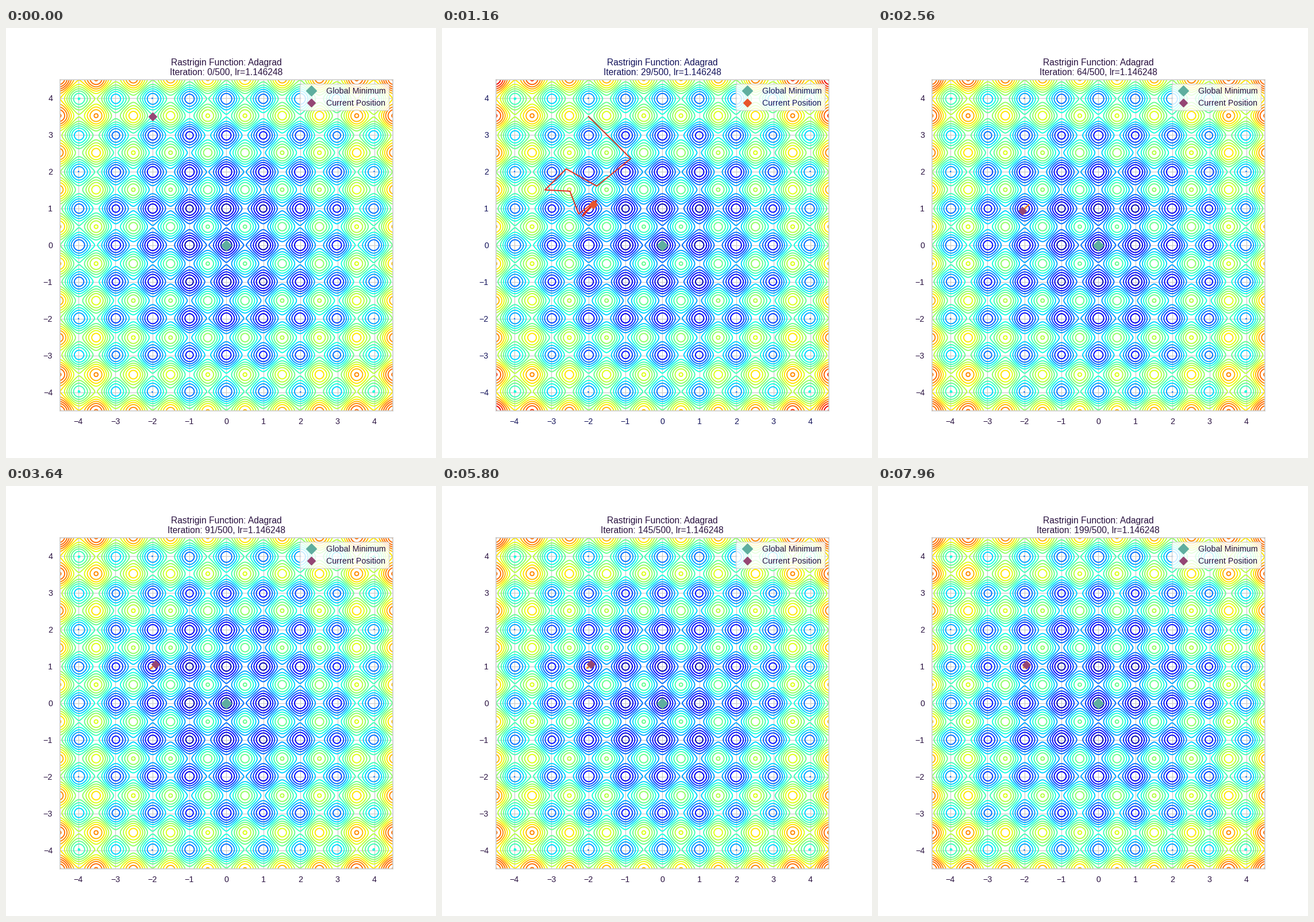
Write a matplotlib script that moves like this. It is 748 px wide and 748 px high and loops after 8000 ms.

```python
import numpy as np
import matplotlib.pyplot as plt
from matplotlib.animation import FuncAnimation

plt.rcParams.update({
    "font.family": "Liberation Sans",
    "font.size": 12,
    "axes.titlesize": 12,
    "xtick.labelsize": 11,
    "ytick.labelsize": 11,
    "legend.fontsize": 11,
    "lines.linewidth": 1.5,
    "lines.solid_capstyle": "round",
    "axes.edgecolor": "0.8",
    "axes.linewidth": 1.25,
    "axes.axisbelow": True,
})

FRAMES, INTERVAL = 200, 40
LR = 1.146248
TRAIL = 30
LIMIT = 4.5
BOX = [0.125, 0.11, 0.775, 0.77]
TEAL = "#5fae9f"

# Two palettes: calm, and a warmer one while a long trail is on show.
CALM = dict(text="#28103f", marker="#954674", trail="#f5862a", top=0.79)
WARM = dict(text="#12125a", marker="#e8552c", trail="#e02f20", top=0.93)


def rastrigin(x, y):
    return (20 + x**2 - 10 * np.cos(2 * np.pi * x)
            + y**2 - 10 * np.cos(2 * np.pi * y))


def gradient(p):
    return 2 * p + 20 * np.pi * np.sin(2 * np.pi * p)


def adagrad(start, steps):
    """Adagrad with the gradient clipped to unit norm."""
    p = np.array(start, float)
    total = np.zeros(2)
    points = [p.copy()]
    for _ in range(steps):
        g = gradient(p)
        g *= min(1, 1 / (np.linalg.norm(g) + 1e-6))
        total += g**2
        p = p - LR * g / (np.sqrt(total) + 1e-10)
        points.append(p)
    return np.array(points)


def add_plot_axes(fig):
    ax = fig.add_axes(BOX)
    ax.set_xlim(-LIMIT, LIMIT)
    ax.set_ylim(-LIMIT, LIMIT)
    return ax


def render_backdrop(fig, look):
    """Draw contours, ticks and legend once and return them as an image."""
    fig.clear()
    ax = add_plot_axes(fig)
    side = np.linspace(-LIMIT, LIMIT, 250)
    X, Y = np.meshgrid(side, side)
    levels = np.arange(0, 85, 4)
    colors = plt.get_cmap("jet")(np.minimum(levels / 84, look["top"]))
    ax.contour(X, Y, rastrigin(X, Y), levels=levels, colors=colors,
               linewidths=1.5)
    ax.grid(color="0.8", linewidth=1)
    ax.tick_params(length=6, pad=3.5, bottom=False, left=False,
                   labelcolor=look["text"])
    ax.set_xticks(range(-4, 5))
    ax.set_yticks(range(-4, 5))

    best, = ax.plot(0, 0, "D", color=TEAL, markersize=10)
    here, = ax.plot([], [], "D", color=look["marker"], markersize=8)
    ax.legend([best, here], ["Global Minimum", "Current Position"],
              loc="upper right", framealpha=0.8, edgecolor="0.8",
              labelcolor=look["text"])
    fig.canvas.draw()
    return np.asarray(fig.canvas.buffer_rgba())[..., :3].copy()


fig = plt.figure(figsize=(8, 8), dpi=93.5, facecolor="white")
for look in (CALM, WARM):
    look["image"] = render_backdrop(fig, look)
fig.clear()

back = fig.add_axes([0, 0, 1, 1])
back.axis("off")
backdrop = back.imshow(CALM["image"], aspect="auto", interpolation="nearest")

ax = add_plot_axes(fig)
ax.axis("off")
trail, = ax.plot([], [])
marker, = ax.plot([], [], "D", markersize=8)
title = ax.set_title("")

path = adagrad((-2.0, 3.5), FRAMES)


def update(i):
    part = path[max(0, i - TRAIL):i + 1]
    look = WARM if np.ptp(part, axis=0).max() > 0.9 else CALM
    backdrop.set_data(look["image"])
    trail.set_data(part[:, 0], part[:, 1])
    trail.set_color(look["trail"])
    marker.set_data(path[i:i + 1, 0], path[i:i + 1, 1])
    marker.set_color(look["marker"])
    title.set_text(f"Rastrigin Function: Adagrad\nIteration: {i}/500, lr={LR:.6f}")
    title.set_color(look["text"])
    return backdrop, trail, marker, title


anim = FuncAnimation(fig, update, frames=FRAMES, interval=INTERVAL,
                     repeat=True, repeat_delay=0)
plt.show()
```
